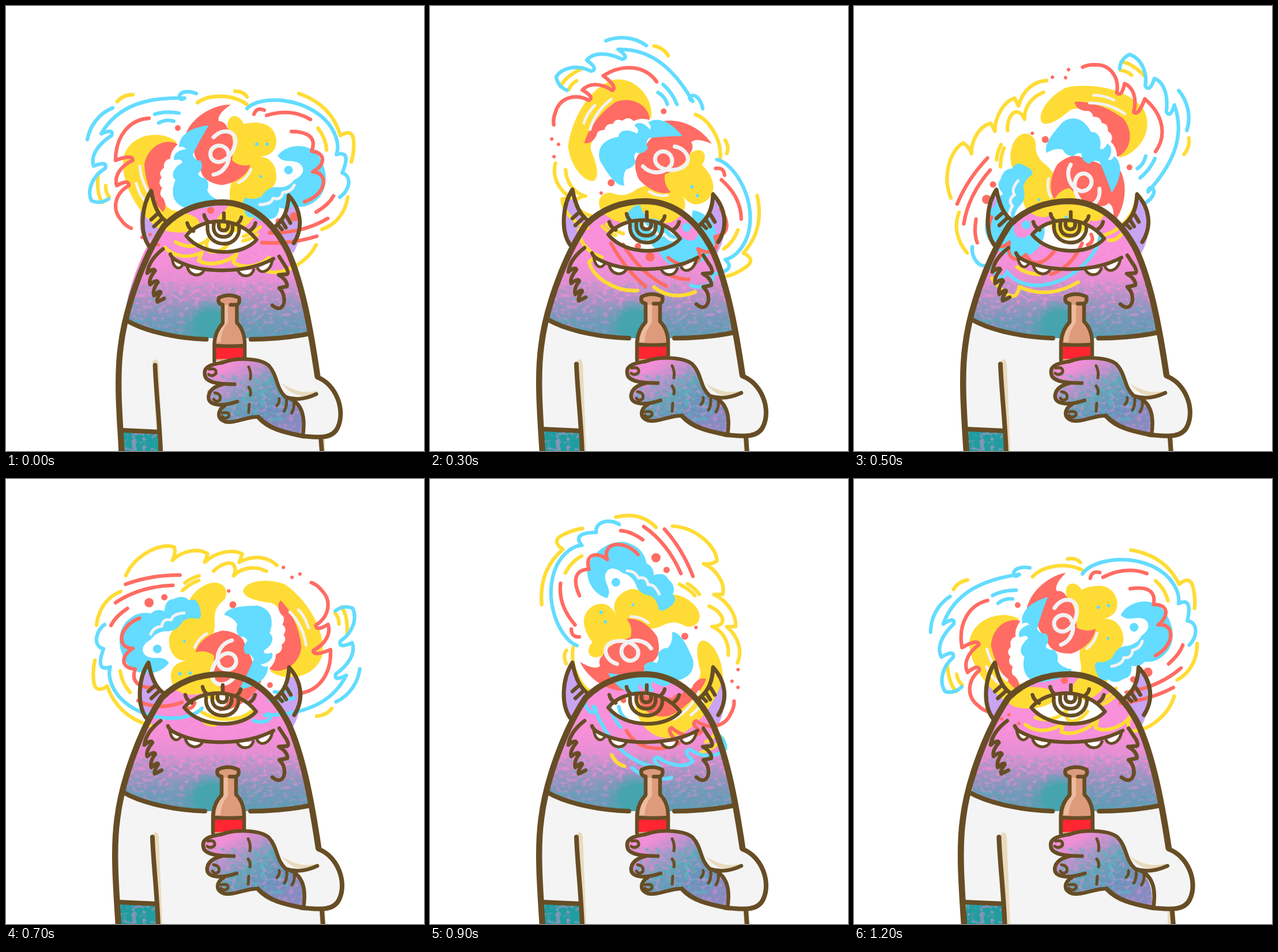
Write an HTML page that moves like this. It is 725 by 773 pixels and loops after 1300 ms.

```html
<!DOCTYPE html>
<html lang="en">
<head>
<meta charset="utf-8">
<title>Dizzy monster</title>
<style>
  html, body { margin: 0; width: 100%; height: 100%; overflow: hidden; background: #fff; }
  svg { display: block; width: 100vw; height: 100vh; }
  .line { fill: none; stroke-linecap: round; stroke-linejoin: round; }
  #ink { stroke: #674d25; stroke-width: 6.5; }
  .yellow { stroke: #ffdc35; } .fillY { fill: #ffdc35; }
  .red { stroke: #ff6c63; } .fillR { fill: #ff6c63; }
  .blue { stroke: #63dcff; } .fillB { fill: #63dcff; }
  .pale { stroke: #f3f2f2; }
</style>
</head>
<body>
<svg viewBox="0 0 725 773">
  <defs>
    <linearGradient id="skin" gradientUnits="userSpaceOnUse" x1="0" y1="340" x2="0" y2="580">
      <stop offset=".42" stop-color="#f890da"/>
      <stop offset=".58" stop-color="#e08fd1"/>
      <stop offset=".72" stop-color="#a991c3"/>
      <stop offset=".84" stop-color="#7897b9"/>
      <stop offset="1" stop-color="#5a9db2"/>
    </linearGradient>
    <radialGradient id="teal">
      <stop offset=".5" stop-color="#45a4ae"/>
      <stop offset="1" stop-color="#45a4ae" stop-opacity="0"/>
    </radialGradient>
    <linearGradient id="hand" gradientUnits="userSpaceOnUse" x1="380" y1="612" x2="460" y2="740">
      <stop offset=".1" stop-color="#f08fd6"/>
      <stop offset=".3" stop-color="#b893cb"/>
      <stop offset=".5" stop-color="#6ba0b7"/>
      <stop offset=".75" stop-color="#6a92bb"/>
      <stop offset="1" stop-color="#858cc0"/>
    </linearGradient>
    <linearGradient id="fade" gradientUnits="userSpaceOnUse" x1="0" y1="420" x2="0" y2="575">
      <stop offset="0" stop-color="#fff"/>
      <stop offset=".5" stop-color="#bbb"/>
      <stop offset="1" stop-color="#222"/>
    </linearGradient>
    <mask id="fadeMask"><rect width="725" height="773" fill="url(#fade)"/></mask>
    <filter id="pinkGrain" x="0" y="0" width="1" height="1" color-interpolation-filters="sRGB">
      <feTurbulence type="fractalNoise" baseFrequency=".11 .15" numOctaves="5" seed="4"/>
      <feColorMatrix values="0 0 0 0 .95  0 0 0 0 .56  0 0 0 0 .84  0 0 0 6 -3.1"/>
    </filter>
    <filter id="tealGrain" x="0" y="0" width="1" height="1" color-interpolation-filters="sRGB">
      <feTurbulence type="fractalNoise" baseFrequency=".1 .14" numOctaves="5" seed="9"/>
      <feColorMatrix values="0 0 0 0 .32  0 0 0 0 .72  0 0 0 0 .75  0 0 0 6 -3.1"/>
    </filter>
    <path id="headShape" d="M204 546C215 470 245 408 270 380C300 350 335 340 375 340C428 342 465 378 490 425C512 470 522 525 528 567Q480 578 424 577H345Q255 574 204 546Z"/>
    <path id="handShape" d="M342 637C340 622 360 620 375 618C400 608 440 610 455 622C470 640 470 665 485 675Q522 690 516 745C480 738 455 732 437 712C420 710 395 724 378 720C365 715 365 700 375 690C358 692 346 682 350 668L372 654C350 653 343 648 342 637Z"/>
    <clipPath id="headClip"><use href="#headShape"/></clipPath>
    <clipPath id="handClip"><use href="#handShape"/></clipPath>
  </defs>

  <!-- flat fills -->
  <path fill="#c9a4f2" d="M247 320C230 345 226 390 243 415L278 375C260 365 252 345 247 320ZM492 327C490 350 484 368 466 382L498 430C518 395 515 350 492 327Z"/>
  <path fill="#f4f4f4" d="M205 545C186 600 188 690 191 737H262L266 773H552V748C580 748 585 720 580 690C575 660 560 650 542 640L528 567H424L345 577Z"/>
  <path fill="#e9dabd" d="M254 618Q262 608 265 622L271 773H263ZM544 748h9v25h-9ZM478 655Q510 677 540 668L539 674Q500 686 478 655Z"/>
  <path fill="#1f9d9f" d="M195 737h67l3 36h-70Z"/>
  <rect x="197" y="740" width="64" height="33" filter="url(#pinkGrain)" opacity=".5"/>
  <use href="#headShape" fill="url(#skin)"/>
  <g clip-path="url(#headClip)">
    <rect x="190" y="480" width="345" height="100" filter="url(#tealGrain)" opacity=".35"/>
    <g mask="url(#fadeMask)"><rect x="190" y="420" width="345" height="160" filter="url(#pinkGrain)"/></g>
    <ellipse cx="356" cy="555" rx="50" ry="46" fill="url(#teal)"/>
  </g>
  <path fill="#fff" d="M309 397C335 365 400 360 434 404C410 432 340 435 309 397Z"/>

  <!-- spinning colours -->
  <g id="swirl">
    <path class="fillY" d="M296 236C270 215 220 220 205 258C195 300 225 355 262 385C295 400 332 394 336 378C335 365 310 358 290 355C272 350 262 320 258 290Z"/>
    <path class="fillR" d="M298 240C275 228 245 245 240 275C242 310 255 340 272 358Q281 348 272 333Q264 328 271 316Q262 308 270 298Q263 289 274 281Q272 268 285 265Q285 252 298 240Z"/>
    <path class="fillY" d="M385 215C380 187 404 184 412 205C440 198 468 205 469 235C468 255 455 260 440 262C463 262 472 285 468 305Q460 322 447 325Q446 350 430 366C420 385 395 398 380 394C362 390 362 370 372 362Q390 350 388 325C388 305 400 290 405 280L385 268Z"/>
    <path class="fillR" d="M390 171C355 172 322 195 312 222Q324 223 331 232C322 248 326 266 338 275C334 295 350 308 375 311C395 308 418 296 424 276Q405 280 392 268C396 245 394 222 384 212Q380 200 369 200C366 190 378 180 390 171Z"/>
    <path class="fillB" d="M352 207C325 210 300 222 300 245Q310 243 312 249C295 250 288 262 292 268Q305 264 306 272C288 282 286 296 294 302C284 325 290 345 312 351C335 352 365 352 371 338C361 335 352 328 349 320Q354 308 346 299Q336 299 333 291Q344 282 338 269Q326 268 324 258Q335 235 352 207Z"/>
    <path class="fillB" d="M471 260C488 238 530 236 545 265C560 290 558 325 535 340C522 350 508 350 498 347Q488 356 474 350Q472 370 457 370Q440 378 430 366Q416 372 412 350Q409 336 416 333Q430 338 443 331Q455 312 473 315Q490 315 500 302C514 295 520 285 511 275C498 264 482 276 471 260Z"/>
    <circle class="fillB" cx="490" cy="285" r="7.5"/>
    <g class="fillB"><circle cx="435" cy="240" r="3"/><circle cx="453" cy="240" r="3"/><circle cx="442" cy="296" r="2.5"/></g>
    <g class="fillR">
      <circle cx="298" cy="212" r="5"/><circle cx="355" cy="355" r="6"/><circle cx="361" cy="379" r="3"/>
      <circle cx="236" cy="402" r="3"/><circle cx="250" cy="397" r="3"/><circle cx="264" cy="415" r="3"/>
      <circle cx="500" cy="366" r="8"/><circle cx="473" cy="374" r="5.5"/>
    </g>
    <g class="line" stroke-width="6.3">
      <g class="pale">
        <path stroke-width="7" d="M360 228C375 212 398 215 398 235C396 262 368 282 356 264C348 246 372 234 384 250C392 270 378 290 360 293"/>
        <path stroke-width="5" d="M232 278Q235 312 257 337M226 308Q231 328 242 340M425 284Q418 300 403 307M440 345Q460 345 463 334Q478 338 480 324Q495 323 500 311"/>
      </g>
      <path class="yellow" d="M193 166Q203 154 220 154M332 168C350 154 390 151 418 171M397 148Q412 148 418 158M508 152C545 165 570 190 580 225Q602 212 603 235Q604 255 599 271M541 212Q555 230 556 250M593 332C588 360 572 380 548 388M160 291Q156 325 167 341M173 312Q172 322 179 332
        M538 415C520 450 475 470 451 460Q449 448 456 437C440 452 410 458 394 445L400 431C380 448 350 452 334 442L340 428C315 440 290 435 275 419
        M385 415C372 428 355 430 350 424Q345 415 351 405C335 420 312 420 294 410M436 397Q425 405 411 408M441 384Q425 397 412 400"/>
      <path class="blue" d="M185 177C160 187 145 210 141 232M330 152C315 146 298 149 301 160Q303 164 310 160C250 158 195 170 165 222Q188 212 183 225C160 240 146 260 152 278Q177 268 172 282C150 295 140 320 148 338Q163 345 178 335M258 188Q278 182 300 186M265 203Q278 196 291 200M418 178C440 155 520 156 560 205C575 225 578 245 573 258Q600 250 583 290C602 296 595 322 579 332"/>
      <path class="red" d="M248 195C215 197 190 225 190 268Q220 257 220 268C195 280 188 298 192 312Q214 300 213 312C190 325 182 352 200 372Q207 382 217 386M430 188Q435 175 448 181M452 190Q495 177 528 197M495 218C522 218 540 228 530 252C555 255 555 276 532 288C562 290 555 328 518 340M568 330Q560 345 538 358M558 369Q515 395 457 394M539 400Q495 414 444 411"/>
    </g>
  </g>

  <!-- hand and bottle -->
  <path fill="#dd9b7c" d="M374 517Q364 515 367 505Q385 496 403 505Q405 514 399 517V548Q413 562 413 585V616H360V585Q361 565 374 549Z"/>
  <path fill="#edbb9e" d="M377 519h8V550Q374 562 372 584H364Q363 563 377 549Z"/>
  <path fill="#ff2632" d="M360 589h53v24h-53Z"/>
  <use href="#handShape" fill="url(#hand)"/>
  <g clip-path="url(#handClip)">
    <rect x="340" y="640" width="150" height="80" filter="url(#tealGrain)" opacity=".7"/>
    <rect x="340" y="606" width="180" height="140" filter="url(#pinkGrain)" opacity=".4"/>
  </g>

  <!-- outlines -->
  <g id="ink" class="line">
    <g stroke-width="10.5">
      <path d="M195 775C190 700 186 640 193 590C200 530 230 440 270 380C300 350 335 339 375 339C428 341 465 376 490 425C515 480 530 560 542 641"/>
      <path stroke-width="8" d="M542 643C575 655 592 700 578 730C568 752 540 747 515 745C480 738 455 732 437 712M548 750L550 775M205 545C240 565 300 576 345 577M424 577Q480 577 528 567M254 622C255 660 262 720 264 775M196 735L262 738"/>
    </g>
    <path d="M437 712C420 710 395 724 378 720C362 714 365 700 378 692M400 685C370 695 346 692 349 675C351 664 362 658 374 655M395 655C365 655 342 652 342 637C340 622 360 620 375 617C400 608 440 610 455 622C472 640 468 662 485 677Q525 687 516 745M485 677Q510 686 540 672"/>
    <path stroke-width="5" d="M350 629Q363 626 362 636Q356 643 349 638M360 670Q372 672 369 682Q362 688 358 681M373 705Q387 702 385 711Q378 717 373 711M420 625Q425 635 423 646M420 660Q425 667 423 674M421 690L420 704M474 680Q475 687 470 692M487 682Q488 693 483 702M500 683Q502 696 496 705"/>
    <path d="M374 517Q364 515 367 505Q385 496 403 505Q405 514 399 517H388M374 517V549Q360 564 359 585V615M399 517V548Q413 562 413 585V610M360 588Q387 590 412 588"/>
    <path stroke-width="7" d="M243 415C226 390 230 345 247 319C252 345 260 365 278 375M500 410C518 382 512 350 491 327C490 350 484 368 466 382"/>
    <path d="M247 369L257 360M252 381L265 369M471 378L479 386M478 370L486 383M487 363L494 375"/>
    <path d="M309 397C335 365 400 360 434 404C410 432 340 435 309 397ZM347 380C345 400 360 411 376 411C395 411 405 396 403 380M358 377C356 393 364 399 376 399C389 399 393 389 391 376M367 377C366 385 370 388 376 388C382 388 385 382 383 376M311 375Q313 384 322 389M341 361Q342 367 347 372M376 358V371M407 365Q406 371 401 375M432 375Q430 384 421 389"/>
    <path fill="#fff" stroke-width="5" d="M284 435C286 455 298 458 304 446M311 450C314 468 336 470 341 456M401 458C408 470 424 470 429 456M436 454C442 464 458 460 462 440"/>
    <path d="M281 429Q283 435 290 439C335 464 415 463 464 437M268 420C255 430 242 445 240 462Q252 452 254 458Q242 472 245 482Q257 472 259 478Q249 490 252 501Q264 490 264 496Q256 506 258 512L270 506M474 433L487 453Q493 466 484 464L473 465Q489 474 488 485L474 488Q484 497 483 512Q478 531 462 518"/>
  </g>
</svg>
<script>
  const STEP = 100, STEPS = 13, MID_X = 372, MID_Y = 288;
  const swirl = document.getElementById('swirl');
  const ink = document.getElementById('ink');

  // step, turn in degrees, drift x, drift y
  const keys = [
    [0, 0, 0, 0], [3, 58, 8, -2], [5, 130, 0, 0], [7, 177, 8, -2],
    [8, 211, 2, -6], [10, 280, 2, 1], [12, 350, -2, -7], [13, 360, 0, 0]
  ];
  // hand-drawn wobble: width, shift x, shift y
  const looks = { A: [.978, 2, 2], B: [1, 0, 0], C: [1.022, 0, 0] };
  const wobble = 'ABCBABCBABCBC';

  function pose(step) {
    const i = keys.findIndex(k => k[0] > step);
    const a = keys[i - 1], b = keys[i];
    const f = (step - a[0]) / (b[0] - a[0]);
    return a.map((v, n) => v + (b[n] - v) * f);
  }

  let last = -1;
  function draw() {
    const step = Math.floor(performance.now() / STEP) % STEPS;
    if (step !== last) {
      last = step;
      const [, turn, dx, dy] = pose(step);
      swirl.setAttribute('transform', `translate(${dx} ${dy}) rotate(${turn} ${MID_X} ${MID_Y})`);
      const [s, x, y] = looks[wobble[step]];
      ink.setAttribute('transform', `translate(${MID_X * (1 - s) + x} ${y}) scale(${s} 1)`);
    }
    requestAnimationFrame(draw);
  }
  draw();
</script>
</body>
</html>
```
